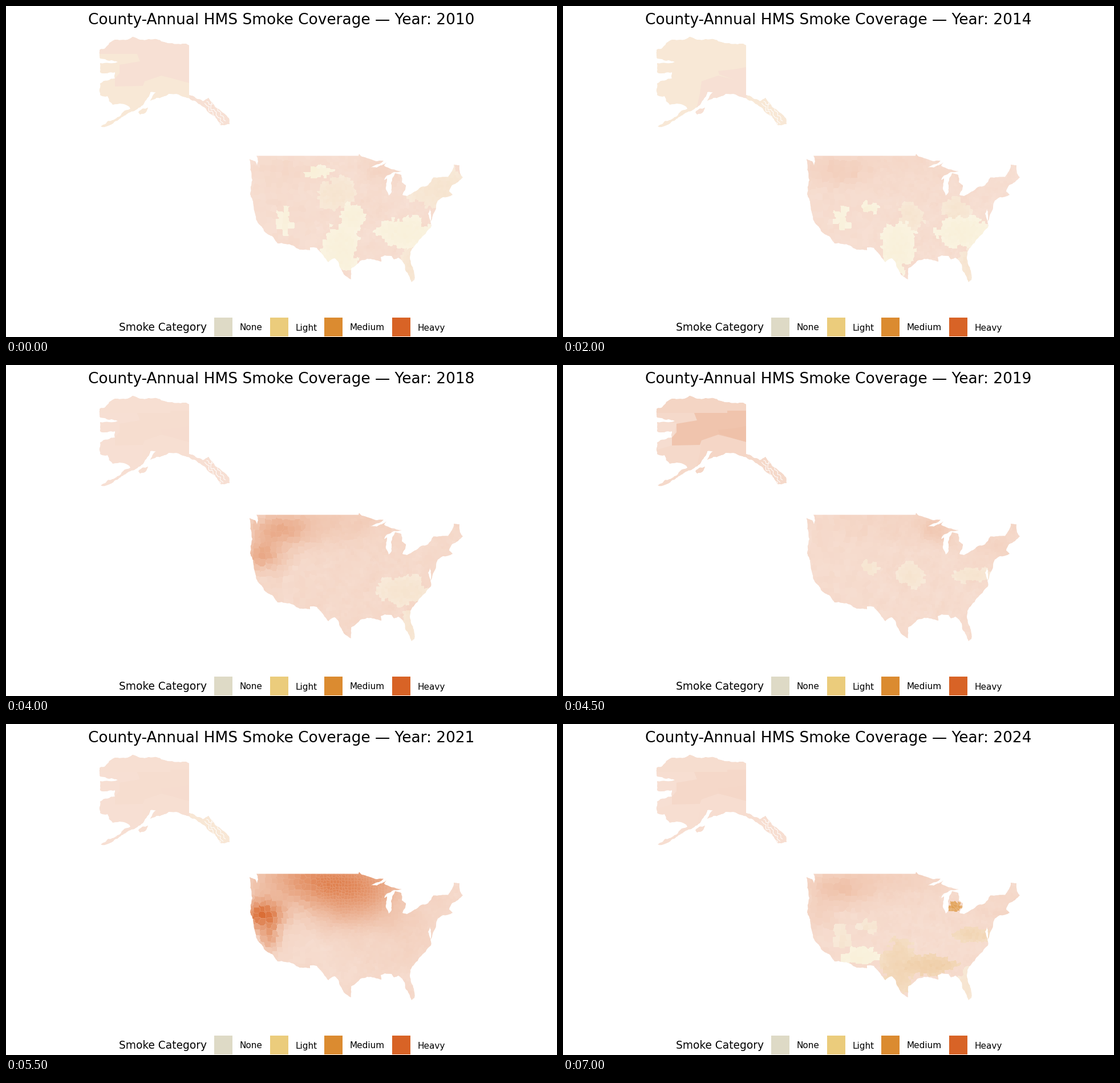
Write a matplotlib script that moves like this. It is 966 by 580 pixels and loops after 7.5 s.

```python
import numpy as np
import matplotlib.pyplot as plt
from matplotlib.animation import FuncAnimation
from matplotlib.colors import to_rgb
from matplotlib.patches import PathPatch, Polygon, Rectangle
from matplotlib.path import Path

W, H, DPI = 966, 580, 100
PX = 72 / DPI
rng = np.random.default_rng(7)

COLORS = {"None": "#dedac6", "Light": "#ebcc7c", "Medium": "#db8b30", "Heavy": "#d86326"}
INK = {k: np.array(to_rgb(c)) for k, c in COLORS.items()}

plt.rcParams["font.family"] = "DejaVu Sans"
fig = plt.figure(figsize=(W / DPI, H / DPI), dpi=DPI, facecolor="white")
ax = fig.add_axes([0, 0, 1, 1])


# ---- outlines: key points joined by fractal coast -------------------------
def coast(p, q, amp):
    """Midpoint displacement; borders longer than 40 px stay straight."""
    d = q - p
    n = np.hypot(*d)
    if n < 4 or n > 40:
        return [p]
    mid = (p + q) / 2 + np.array([-d[1], d[0]]) * rng.uniform(-amp, amp)
    return coast(p, mid, amp) + coast(mid, q, amp)


def outline(pts, amp):
    pts = np.array(pts, float)
    ring = [v for p, q in zip(pts, np.roll(pts, -1, 0)) for v in coast(p, q, amp)]
    return Path(np.vstack([ring, ring[:1]]), closed=True)


us_north = [
    (427, 268), (437, 272), (440, 279), (442, 272), (439, 262.5), (618, 262.5), (619, 259),
    (624, 264), (641, 269), (662, 271), (645, 280), (639, 283), (650, 283), (667, 274),
    (663, 280), (676, 286), (694, 289), (680, 291), (668, 297), (663, 305), (668, 302),
    (666, 321), (671, 332), (676, 326), (675, 310), (682, 293), (693, 296), (694, 309),
    (701, 314), (695, 331), (703, 333), (728, 317), (740, 314), (749, 300.5), (775, 299.5),
    (785, 278), (795, 279), (796, 293), (801, 300), (782, 314), (777, 325), (783, 331)]
us_south = [
    (766, 335), (757, 341), (754, 353), (747, 373), (744, 378), (743, 355), (740, 364),
    (745, 388), (725, 409), (709, 431), (708, 441), (715, 464), (716, 480), (711, 484),
    (700, 463), (699, 453), (688, 441), (680, 444), (676, 438), (664, 437), (657, 440),
    (658, 448), (633, 443), (622, 446), (605, 460), (605, 479), (592, 470), (583, 449),
    (576, 442), (565, 449), (552, 432), (545, 424), (533, 423), (533, 428), (515, 427),
    (490, 417), (476, 416), (466, 403), (452, 394), (437, 365), (428, 330), (432, 305)]
us_path = outline(us_north + us_south, 0.09)

alaska = [
    (165, 76), (174, 74), (181, 65), (195, 59), (222, 54), (250, 58), (280, 64), (310, 66),
    (321, 69), (321, 156), (345, 167), (355, 161), (372, 180), (391, 197), (392, 207),
    (376, 209), (352, 183), (333, 167), (308, 158), (285, 154), (275, 159), (253, 166),
    (263, 151), (253, 151), (243, 168), (225, 184), (190, 203), (166, 211), (195, 195),
    (218, 180), (207, 172), (187, 173), (178, 158), (165, 156), (165, 136), (191, 127),
    (191, 116), (165, 116), (165, 100), (196, 98), (165, 92)]
kodiak = [(232, 186), (239, 180), (249, 178), (246, 185), (235, 190)]
ak_path = Path.make_compound_path(outline(alaska, 0.13), outline(kodiak, 0.13))

# Alaska regions, later ones painted over earlier: share of the year's heat, area.
AK_REGIONS = {
    "southwest": (0.25, [(160, 50), (400, 50), (400, 215), (160, 215)]),
    "arctic": (0.4, [(160, 50), (322, 50), (322, 84), (160, 84)]),
    "west": (0.1, [(160, 101), (199, 101), (191, 141), (160, 150)]),
    "interior": (1, [(230, 84), (288, 84), (288, 80), (322, 80), (322, 136), (243, 132), (240, 140),
                     (191, 141), (191, 127), (199, 118), (199, 103), (235, 97)]),
    "southcentral": (0.35, [(240, 154), (243, 132), (272, 122), (300, 129), (322, 135),
                            (322, 165), (250, 168), (250, 190), (232, 190)]),
    "panhandle": (0.25, [(322, 150), (400, 150), (400, 215), (322, 215)]),
    "fairbanks": (1.1, [(272, 114), (300, 111), (322, 107), (322, 135), (300, 129), (274, 120)]),
}

# ---- county cells ---------------------------------------------------------
X0, X1, Y0, Y1 = 420, 810, 255, 495


def seeds(xa, xb, step):
    gx, gy = np.meshgrid(np.arange(xa, xb, step), np.arange(Y0, Y1, step))
    p = np.c_[gx.ravel(), gy.ravel()]
    return p + rng.uniform(-0.33, 0.33, p.shape) * step


cells = np.vstack([seeds(X0, 545, 10), seeds(548, X1, 5.4)]).astype(np.float32)
cx, cy = cells.T
dx = np.abs(np.arange(X0, X1, dtype=np.float32)[:, None] + 0.5 - cx)
owner = np.array([np.maximum(dx, np.abs(y + 0.5 - cy)).argmin(1) for y in range(Y0, Y1)])
border = (owner != np.roll(owner, 1, 0)) | (owner != np.roll(owner, 1, 1))


def ripple(waves=12):
    """Smooth random field over the cells with unit spread."""
    k = rng.normal(0, 0.13, (waves, 2))
    return np.sin(cells @ k.T + rng.uniform(0, 6.3, waves)).sum(1) / np.sqrt(waves / 2)


# ---- smoke: each year names the places that stand out ----------------------
PLACES = {  # centre and radii
    "northwest": (480, 290, 50, 26), "oregon": (450, 334, 34, 25), "sierra": (462, 374, 16, 24),
    "plains": (560, 270, 110, 42), "midwest": (605, 315, 75, 42), "lakes": (655, 287, 35, 24),
    "michigan": (687, 319, 14, 9), "northeast": (762, 320, 50, 38), "virginia": (718, 368, 34, 14),
    "ohio": (690, 358, 24, 24), "east": (702, 368, 62, 58), "mississippi": (650, 370, 15, 44),
    "southeast": (700, 396, 46, 26), "florida": (708, 458, 14, 36), "gulf": (640, 423, 52, 17),
    "texas": (588, 425, 30, 46), "missouri": (608, 368, 24, 24), "nebraska": (580, 330, 34, 30),
    "rockies": (536, 355, 18, 11), "dakota": (545, 291, 30, 11), "utah": (489, 374, 12, 24),
    "desert": (520, 408, 34, 16),
}
years = {}


def distance2(place):
    x, y, rx, ry = PLACES[place]
    return ((cx - x) / rx) ** 2 + ((cy - y) / ry) ** 2


def alaska_colors(heat, medium, light):
    for name, (share, _) in AK_REGIONS.items():
        cat = "Light" if name in light else "Medium" if name in medium else "Heavy"
        yield 1 - (0.2 + heat * share) * (1 - INK[cat])


def year(y, base, heat, medium="", light="", strong={}, ak_heat=0, ak_medium="", ak_light=""):
    grain, swell = rng.normal(0, 1, len(cells)), ripple()
    alpha = base + 0.005 * grain + 0.007 * swell
    for place, gain in heat.items():
        alpha += gain * np.exp(-distance2(place))
    ink = np.tile(INK["Heavy"], (len(cells), 1))
    patches = [(p, "Medium", 0.21) for p in medium.split()]
    patches += [(p, "Light", 0.26) for p in light.split()]
    patches += [(p, "Medium", a) for p, a in strong.items()]
    for place, cat, a in patches:
        d2 = distance2(place)
        hit = d2 + 0.22 * swell + 0.1 * grain < 1
        ink[hit] = INK[cat]
        alpha[hit] = (a * (1.06 - 0.15 * d2 + 0.03 * grain))[hit]
    alpha = np.clip(alpha, 0.15, 1)
    rgb = (1 - alpha[:, None] * (1 - ink))[owner]
    seam = border * np.clip(alpha[owner] - 0.4, 0, 0.5) * 0.35
    years[y] = rgb + (1 - rgb) * seam[..., None], [*alaska_colors(ak_heat, ak_medium, ak_light)]


year(2010, 0.215, dict(northwest=.03, lakes=.05), "northeast nebraska florida",
     "dakota utah texas missouri southeast", ak_medium="southwest southcentral west")
year(2011, 0.215, dict(plains=.06, texas=.08, desert=.08), "northeast utah florida", "rockies virginia",
     ak_medium="southwest west southcentral panhandle")
year(2012, 0.225, dict(northwest=.18, plains=.05), "northeast east florida", "southeast texas",
     ak_medium="southwest arctic west southcentral panhandle")
year(2013, 0.22, dict(northwest=.12, plains=.05), "east florida", "southeast texas",
     ak_heat=.03, ak_medium="panhandle")
year(2014, 0.215, dict(northwest=.07, plains=.03), "ohio missouri florida",
     "rockies utah texas southeast", ak_medium="southwest arctic west interior panhandle")
year(2015, 0.235, dict(northwest=.28, plains=.12), "east florida", "texas", ak_heat=.15)
year(2016, 0.212, dict(plains=.03), "east midwest northeast gulf florida", "texas virginia",
     ak_medium="arctic southcentral", ak_light="panhandle")
year(2017, 0.23, dict(northwest=.34, plains=.1, oregon=.1), "east florida", "texas",
     ak_heat=.03, ak_medium="southcentral panhandle")
year(2018, 0.24, dict(oregon=.3, northwest=.25, plains=.1), "southeast florida", ak_heat=.02)
year(2019, 0.225, dict(lakes=.1, plains=.04, northeast=.04), "virginia rockies missouri",
     ak_heat=.18)
year(2020, 0.235, dict(oregon=.45, sierra=.4, northwest=.15, midwest=.05), "southeast florida",
     ak_medium="southwest west southcentral panhandle")
year(2021, 0.235, dict(oregon=.68, sierra=.3, plains=.48, midwest=.26, lakes=.06, east=.05),
     ak_heat=.02, ak_medium="panhandle")
year(2022, 0.23, dict(northwest=.06, plains=.02, oregon=.04), light="utah",
     strong=dict(east=.38, northeast=.36, mississippi=.5), ak_heat=.23, ak_medium="panhandle")
year(2023, 0.26, dict(plains=.12, midwest=.1, lakes=.2, east=.1, northeast=.1), ak_heat=.02)
year(2024, 0.222, dict(northwest=.13, plains=.08, oregon=.06, northeast=.03), "utah rockies florida",
     "desert", dict(virginia=.33, texas=.33, gulf=.38, michigan=.75), ak_heat=.05)

# ---- stage ----------------------------------------------------------------
us_img = ax.imshow(years[2010][0], extent=(X0, X1, Y1, Y0), interpolation="nearest", aspect="auto")
us_img.set_clip_path(PathPatch(us_path, transform=ax.transData))
ax.set(xlim=(0, W), ylim=(H, 0))
ax.axis("off")

ak_clip = PathPatch(ak_path, transform=ax.transData)
ak_patches = [ax.add_patch(Polygon(pts, lw=0)) for _, pts in AK_REGIONS.values()]
for p in ak_patches:
    p.set_clip_path(ak_clip)

# Channels between the panhandle islands.
t = np.linspace(0, 1, 16)
for shift in (-4, 0, 4):
    wiggle = rng.normal(0, 1.1, len(t))
    ax.plot(353 + shift + 27 * t + wiggle, 166 - shift + 40 * t - wiggle, color="white", lw=PX)


def label(x, y, s, size, ha="left"):
    return ax.text(x, y, s, fontsize=size * PX, ha=ha, va="baseline", color="black")


title = label(483, 32, "", 26.35, "center")
label(198, 569, "Smoke Category", 18.7)
for x, name in zip((365, 463, 558, 677), COLORS):
    ax.add_patch(Rectangle((x, 546), 32, 33, fc=COLORS[name], lw=0))
    label(x + 44.5, 568.5, name, 15.2)


def draw(i):
    rgb, tints = years[2010 + i]
    us_img.set_data(rgb)
    for p, c in zip(ak_patches, tints):
        p.set_facecolor(c)
    title.set_text(f"County-Annual HMS Smoke Coverage — Year: {2010 + i}")
    return [us_img, title, *ak_patches]


anim = FuncAnimation(fig, draw, frames=len(years), interval=500, repeat=True, repeat_delay=0)
plt.show()
```
